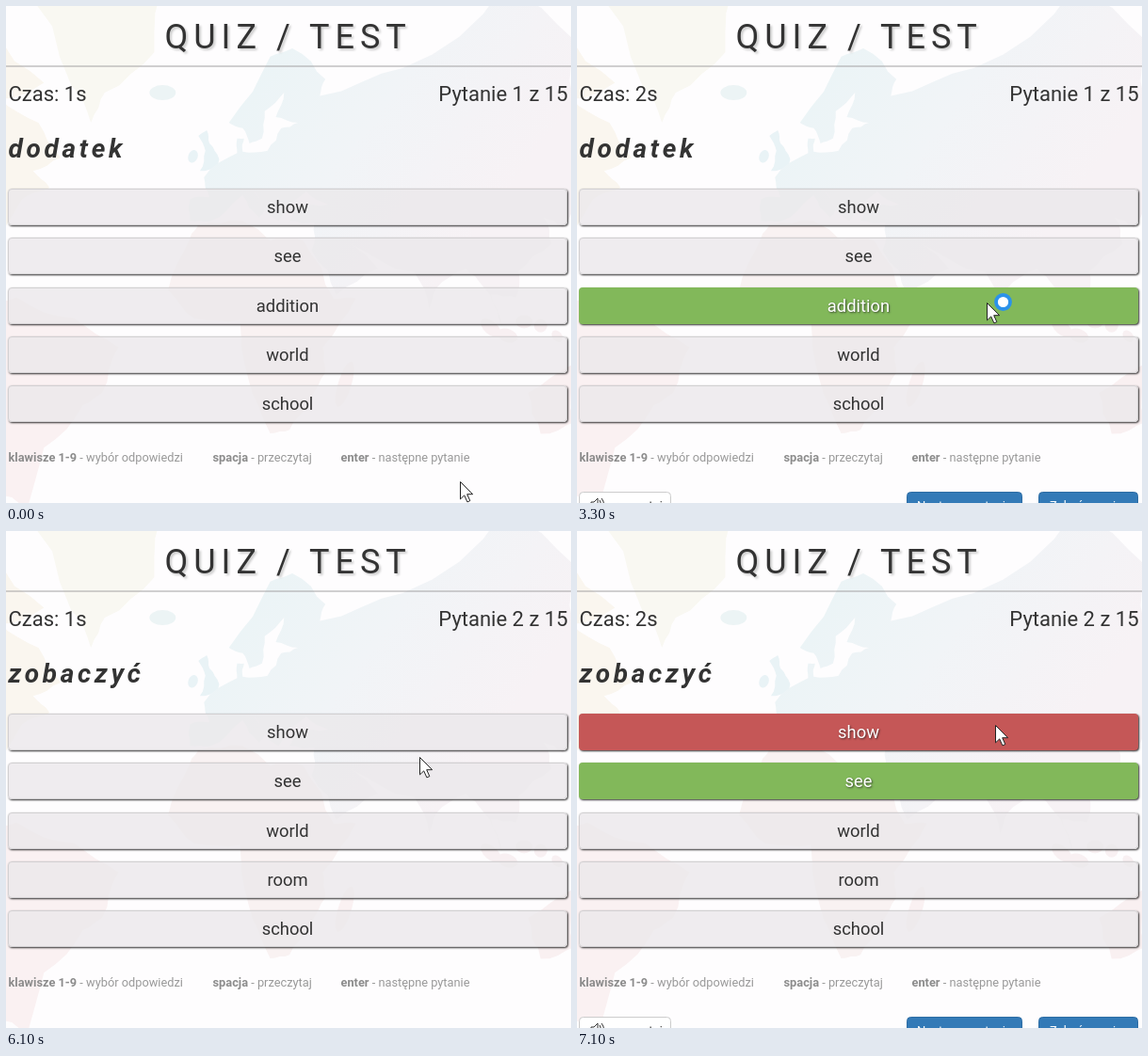
These frames come from a looping animation (600x528 px, 8 s). An HTML page:

```html
<!DOCTYPE html>
<html lang="pl">
<head>
<meta charset="utf-8">
<title>Quiz</title>
<style>
html, body { margin: 0; width: 100%; height: 100%; overflow: hidden; background: #fefdfe; }
body { position: relative; font-family: Roboto, Arial, sans-serif; color: #333; }
svg, #quiz { position: absolute; left: 0; top: 0; width: 600px; height: 528px; }
svg { overflow: hidden; fill: #333; }
#quiz { transform-origin: 299.5px 290.5px; }
#word {
  position: absolute; left: 2.5px; top: 132px; white-space: nowrap;
  font: italic bold 28px/40px Roboto, Arial, sans-serif; letter-spacing: 3.7px;
}
.row {
  position: absolute; left: 2px; width: 594px; height: 39px; box-sizing: border-box;
  border: 1px solid #d2d0d2; border-radius: 4px; box-shadow: 1px 1px 2px rgba(0, 0, 0, .8);
  text-align: center; font-size: 18.4px; line-height: 38px;
}
.title { font-size: 36px; letter-spacing: 6px; filter: drop-shadow(2px 2px 1px #ccc); }
.head { font-size: 22px; }
.hint { font-size: 12.8px; fill: #999; }
.hint tspan { font-weight: bold; fill: #8c8c8c; }
.btn { font-size: 13px; fill: #fff; }
.blue { fill: #337ab7; stroke: #2e6da4; }
</style>
</head>
<body>
<svg viewBox="0 0 600 528">
  <defs>
    <linearGradient id="asia" gradientUnits="userSpaceOnUse" x1="220" y1="80" x2="480" y2="270">
      <stop offset="0" stop-color="#eaf4f6"/>
      <stop offset=".5" stop-color="#f1f4f7"/>
      <stop offset="1" stop-color="#f7f2f5"/>
    </linearGradient>
  </defs>
  <g id="map"></g>
  <text class="title" x="168.5" y="45">QUIZ / TEST</text>
  <path d="M0 64h600" stroke="#a3a2a3"/>
  <text class="head" id="clock" x="2.5" y="101"></text>
  <text class="head" id="count" x="596.5" y="101" text-anchor="end"></text>
  <g class="hint">
    <text x="2.5" y="484"><tspan>klawisze 1-9</tspan> - wybór odpowiedzi</text>
    <text x="219.5" y="484"><tspan>spacja</tspan> - przeczytaj</text>
    <text x="355.5" y="484"><tspan>enter</tspan> - następne pytanie</text>
  </g>
  <g id="foot" class="btn">
    <rect x="2.5" y="516.5" width="97" height="34" rx="4" fill="#fff" stroke="#ccc"/>
    <path d="M15 527h3l4-4v13l-4-4h-3zM24 525q3 4 0 8M26 523q5 6 0 12" fill="none" stroke="#333"/>
    <text x="32" y="534.5" fill="#333">przeczytaj</text>
    <rect class="blue" x="350.5" y="516.5" width="122" height="34" rx="4"/>
    <text x="361" y="534.5">Następne pytanie</text>
    <rect class="blue" x="490.5" y="516.5" width="105" height="34" rx="4"/>
    <text x="502" y="534.5">Zakończ quiz</text>
  </g>
</svg>
<div id="quiz"><div id="word"></div></div>
<svg viewBox="0 0 600 528">
  <g id="cursor" fill="#fff" stroke="#222" stroke-linejoin="round">
    <path id="arrow" d="M.5.5v18.4l4.2-4 3.2 7 2.9-1.3-3.1-6.9h5.9z"/>
    <g id="hand" transform="translate(-8 -1)">
      <path d="M6 2.5c0-2 4-2 4 0v8c0-1.5 3.4-1.5 3.4.3v.7c0-1.3 3-1.2 3 .4v1c0-1.2 2.6-1 2.6.6v5c0 3-2 4.5-2 7H8c0-2.5-3-5-6.5-10-1.2-2 1-3.2 2.5-1.6L6 16z"/>
      <path d="M10 10v4.5M13.4 11v3.5M16.4 12v3" fill="none"/>
    </g>
    <circle id="ring" cx="17.5" cy="-.5" r="7.5" stroke="#2b92ea" stroke-width="3.8"/>
  </g>
</svg>
<script>
const $ = id => document.getElementById(id);
const LOOP = 8000, STEP = 100;

const clamp = k => Math.min(1, Math.max(0, k));
const smooth = k => (k = clamp(k), k * k * (3 - 2 * k));
const easeOut = k => 1 - (1 - clamp(k)) ** 2;
const mix = (a, b, k) => a + (b - a) * k;
const blend = (a, b, k) => `rgba(${a.map((v, i) => mix(v, b[i], k)).join()})`;
const show = (el, on) => { el.style.display = on ? '' : 'none'; };

// Continents: a few "lon,lat" corners, projected (Mercator) and roughened into coasts.
const land = [
  ['#faf6ef', '-80,73 -62,66.5 -78,64 -64,60 -56,53 -66,50 -60,46 -70,43 -80,32'],
  ['#f9f8f2', '-80,78 -72,78 -52,66 -45,60 -40,65 -22,70.5 -18,78'],
  ['#faf1f2', '-80,8 -72,12 -51,4.5 -35,-6 -41,-22 -48,-26 -62,-39 -68,-54 -80,-50'],
  ['#e9f3f6', '-5.5,50 1,51 1.5,52.7 -2,56 -3,58.6 -6,57.5 -3.5,54.5'],
  ['url(#asia)', '-9,37 -9,43 -2,43.5 -4,48.5 8,54 8,57 10.5,57 10,54.3 19,54.5 24,59 30,60 22,61 25,65 18,62 17,57 12.5,56 10,59 5,60 20,70 28,71 40,67 38,64.5 68,68.5 104,77 130,72 130,42 126,35 119,38 122,30 110,21 109,12 100,13 104,1.5 97,16 91,22 80,15 77.5,8 72,21 49,30 56,25 59,22 44,13 35,28 36,36.5 27,37 29,41 41,41.5 33,45 23,37 13.5,45.5 18,40 16,38 10,44 -2,36.8'],
  ['#f9f2f2', '-6,35.8 10,37 20,31 32,31 43,11.5 51,11.7 39,-6 40,-15 35,-24 27,-33.8 20,-34.8 12,-17 9,4 -7.5,4.4 -17,14.5 -10,30'],
  ['#f9f0f1', '113.5,-22 130,-12 130,-31.5 118,-35'],
];
// Islands: lon, lat, half width and half height in pixels, tilt.
const isles = [
  ['#ecf4f5', -19, 65, 14, 8, 0],
  ['#e9f3f6', -8, 53.3, 5, 7, 20],
  ['#faf1f2', 47, -19, 7, 25, 17],
];
for (let i = 0; i < 5; i++) isles.push(['#f8f0f2', 100 + 6 * i, 1 - 3 * Math.sin(i * 2), 13 - 2 * i, 7, 40 - 20 * i]);

let seed = 7;
const rand = () => (seed = seed * 16807 % 2147483647) / 2147483647;
const project = (lon, lat) => {
  const y = Math.log(Math.tan(Math.PI / 4 + lat * Math.PI / 360)) * 180 / Math.PI;
  return [222 + 2.93 * lon, 345 - 2.93 * y];
};
const roughen = pts => pts.flatMap(([x, y], i) => {
  const [u, v] = pts[(i + 1) % pts.length];
  const k = (rand() - .5) * .18;
  return [[x, y], [(x + u) / 2 + (v - y) * k, (y + v) / 2 - (u - x) * k]];
});
const coast = text => roughen(roughen(text.split(' ').map(p => project(...p.split(',').map(Number)))));

$('map').innerHTML = land.map(([fill, text]) => {
  const pts = coast(text).map(p => p.map(v => v.toFixed(1)));
  return `<polygon fill="${fill}" points="${pts.join(' ')}"/>`;
}).join('') + isles.map(([fill, lon, lat, rx, ry, tilt]) =>
  `<ellipse fill="${fill}" rx="${rx}" ry="${ry}" transform="translate(${project(lon, lat)}) rotate(${tilt})"/>`
).join('');

const quizzes = [
  { word: 'dodatek', answers: ['show', 'see', 'addition', 'world', 'school'], pick: 2, right: 2, start: -1200, click: 1560 },
  { word: 'zobaczyć', answers: ['show', 'see', 'world', 'room', 'school'], pick: 0, right: 1, start: 4300, click: 6560 },
];
const SWAP = 4200;

// Pointer moves: from, to (ms), then where it arrives.
const home = [482, 505];
const moves = [
  [300, 1100, 439, 327], [1100, 1300, 438, 326], [3200, 3500, 432, 306],
  [6000, 6300, 444, 187], [6300, 6500, 444, 206],
];
const pointer = t => moves.reduce(([x, y], [from, to, u, v]) => {
  const k = easeOut((t - from) / (to - from));
  return [mix(x, u, k), mix(y, v, k)];
}, home).map(Math.round);

const PLAIN = [235, 233, 235, .8], BLUE = [23, 100, 133, 1], GREEN = [130, 184, 90, 1], RED = [197, 87, 87, 1];
const DARK = [51, 51, 51, 1], WHITE = [255, 255, 255, 1];

const rowTop = i => 194 + 52.3 * i;
const rows = quizzes[0].answers.map((_, i) => {
  const el = document.createElement('div');
  el.className = 'row';
  el.style.top = rowTop(i) + 'px';
  $('quiz').append(el);
  return el;
});

function render(t) {
  const second = t >= SWAP;
  const quiz = quizzes[+second];
  const [x, y] = pointer(t);
  const done = t >= quiz.click;
  const k = smooth((t - quiz.click) / 500);
  const busy = t >= 3300 && t < 5300;
  const hover = done || busy ? -1 : rows.findIndex((_, i) => y >= rowTop(i) && y < rowTop(i) + 40);
  const seconds = Math.max(0, Math.floor((Math.min(t, quiz.click) - quiz.start) / 1000));

  $('clock').textContent = `Czas: ${seconds}s`;
  $('count').textContent = `Pytanie ${second ? 2 : 1} z 15`;
  $('word').textContent = quiz.word;

  rows.forEach((el, i) => {
    const mark = done && (i === quiz.right ? GREEN : i === quiz.pick ? RED : null);
    const from = i === hover || (done && i === quiz.pick) ? BLUE : PLAIN;
    const lit = from === BLUE ? 1 : mark ? k : 0;
    el.textContent = quiz.answers[i];
    el.style.backgroundColor = blend(from, mark || from, mark ? k : 0);
    el.style.borderColor = `rgba(210,208,210,${1 - lit})`;
    el.style.color = blend(DARK, WHITE, lit);
    el.style.textShadow = `1px 1px 2px rgba(30,30,30,${.7 * lit})`;
  });

  // The card shrinks to half, swaps its content and grows back.
  const size = second ? mix(.5, 1, smooth((t - 4130) / 550)) : mix(1, .5, smooth((t - 3630) / 470));
  $('quiz').style.transform = size < 1 ? `scale(${size})` : 'none';
  $('quiz').style.opacity = size;
  $('foot').style.opacity = k;

  $('cursor').setAttribute('transform', `translate(${x} ${y})`);
  show($('hand'), hover >= 0);
  show($('arrow'), hover < 0);
  show($('ring'), busy);
}

const start = performance.now();
function tick() {
  const t = (performance.now() - start) % LOOP;
  render(Math.floor(t / STEP) * STEP);
  requestAnimationFrame(tick);
}
tick();
</script>
</body>
</html>
```
